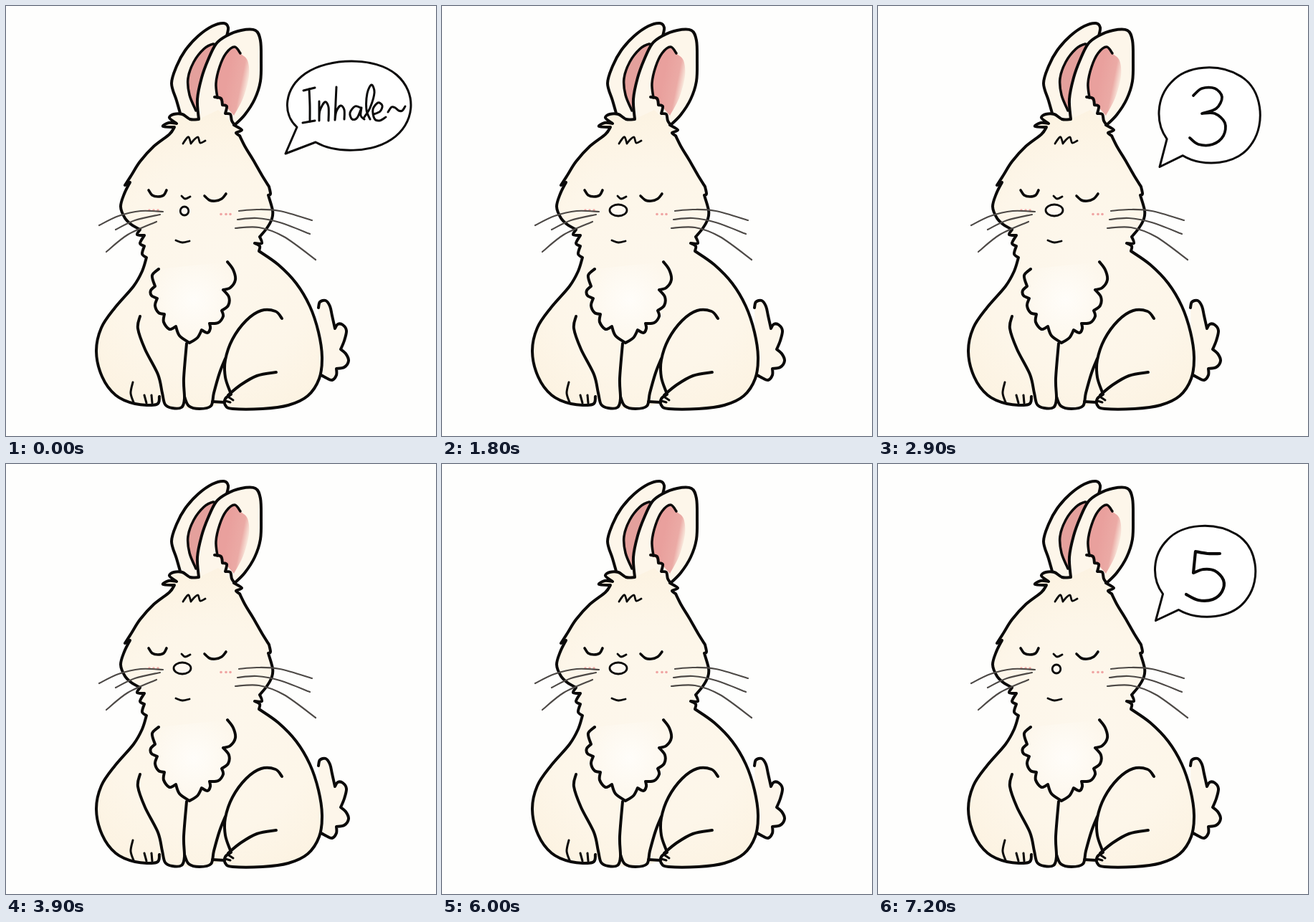
An HTML page for the animation above (8 s loop, 600 by 600 pixels).

```html
<!DOCTYPE html>
<html lang="en">
<head>
<meta charset="utf-8">
<title>Breathing rabbit</title>
<style>
  html, body { margin: 0; width: 100%; height: 100%; overflow: hidden; background: #fefefd; }
  svg { display: block; width: 100%; height: 100%; }
  path, ellipse { fill: none; stroke: #0b0a0a; stroke-width: 4; stroke-linecap: round; stroke-linejoin: round; }
  .bubble { stroke-width: 3; vector-effect: non-scaling-stroke; fill: #fff; }
</style>
</head>
<body>
<svg id="stage" viewBox="0 0 600 600">
  <defs>
    <linearGradient id="innerEar" gradientUnits="userSpaceOnUse" x1="310" y1="95" x2="340" y2="101">
      <stop offset="0" stop-color="#e9a09d"/>
      <stop offset=".65" stop-color="#ebaaa5"/>
      <stop offset="1" stop-color="#fbf2e5"/>
    </linearGradient>
    <radialGradient id="fur" gradientUnits="userSpaceOnUse" cx="290" cy="370" r="240">
      <stop offset="0" stop-color="#fdf7ec"/>
      <stop offset=".6" stop-color="#fdf6e9"/>
      <stop offset="1" stop-color="#fcf2e0"/>
    </radialGradient>
    <radialGradient id="chest" gradientUnits="userSpaceOnUse" cx="262" cy="410" r="62">
      <stop offset="0" stop-color="#fffdf9"/>
      <stop offset="1" stop-color="#fdf7ec"/>
    </radialGradient>
  </defs>
</svg>
<script>
const LOOP = 8000;
const stage = document.getElementById('stage');

function add(tag, attributes, parent = stage) {
  const node = document.createElementNS('http://www.w3.org/2000/svg', tag);
  for (const key in attributes) node.setAttribute(key, attributes[key]);
  return parent.appendChild(node);
}

// Smooth curve through "x,y x,y ..." points; "/" marks a sharp corner.
function curve(text) {
  let d = '', last = null;
  for (const part of text.split('/')) {
    const p = part.trim().split(/\s+/).map(s => s.split(',').map(Number));
    if (last) p.unshift(last);
    else d = 'M' + p[0];
    for (let i = 0; i < p.length - 1; i++) {
      const a = p[i], b = p[i + 1], before = p[i - 1] || a, after = p[i + 2] || b;
      const c1 = a.map((v, k) => v + (b[k] - before[k]) / 6);
      const c2 = b.map((v, k) => v - (after[k] - a[k]) / 6);
      d += `C${c1} ${c2} ${b}`;
    }
    last = p[p.length - 1];
  }
  return d;
}

const fill = (d, color) => add('path', { d, style: `fill:${color};stroke:none` });
const line = (text, width = 4, color = '#0b0a0a', parent = stage) =>
  add('path', { d: curve(text), style: `stroke-width:${width};stroke:${color}` }, parent);

// Tail
const tail = '436,421 438,413 446,411 452,419 455,432 459,450 / 463,444 470,445 475,453 472,467 467,479 / 474,485 478,495 472,504 461,506 / 461,515 455,522 447,519 438,514';
fill(curve(tail), '#fdf6ea');
line(tail);

// Ears
const backEar = '244,153 238,132 231,108 238,84 250,62 268,42 288,28 304,24 310,30 308,42';
const frontEar = '269,158 267,130 273,100 282,75 293,53 307,42 328,34 348,34 355,48 356,75 355,105 347,130 333,152 318,167';
const backInner = '265,146 256,124 254,101 262,78 276,60 289,53 293,56';
const frontInner = '295,128 293,108 298,85 307,66 319,57 327,66';
fill(curve(backEar) + 'L270 158Z', '#fdf6ea');
fill(curve(backInner) + 'L268 150Z', '#e4a09c');
line(backInner, 3.5);
line(backEar);
fill(curve(frontEar) + 'Z', '#fdf6ea');
fill(curve(frontInner + ' 337,76 339,98 331,128 318,153') + 'L306 139Z', 'url(#innerEar)');
line(frontInner, 3.5);
line(frontEar);

// Head and body silhouette
const leftSide = '269,158 257,158 246,151 234,151 228,156 238,164 / 227,163 219,168 235,169 / 228,179 206,196 187,217 175,236 166,250 / 173,246 / 165,262 160,280 166,296 175,305 187,312 / 183,319 193,320 / 187,331 193,335 / 190,346 196,351 / 190,370 178,391 152,421 133,449 126,482 134,517 153,543 180,555 210,556 214,545';
const rightSide = '314,542 306,548 306,557 316,562 358,562 394,557 421,544 437,520 441,490 436,455 424,419 405,387 380,361 353,342 / 354,335 347,331 / 357,331 354,322 / 364,310 371,297 372,285 366,264 / 369,262 367,252 / 357,236 345,215 334,197 326,181 / 321,177 329,173 318,166';
fill(curve(leftSide) + 'L222 558L255 562L285 560L306 553' + curve(rightSide).replace('M', 'L') + 'L296 145Z', 'url(#fur)');
line(leftSide);
line(rightSide);
line('291,127 300,129 302,138 / 308,140 306,150 / 313,151 315,160 319,166');

// Chest fur
const chest = '213,367 204,376 208,391 / 202,397 203,404 211,408 / 208,418 213,428 221,430 / 220,441 228,451 237,447 / 242,460 256,470 / 267,463 273,452 / 281,456 285,450 284,443 / 296,442 303,433 301,425 / 310,418 311,406 303,396 / 313,393 320,382 317,368 309,357';
fill(curve(chest) + 'Z', 'url(#chest)');
line(chest);

// Legs and paws
[
  '187,433 184,450 194,479 212,514 218,540 222,556 232,561 245,560 249,548 248,520 252,471',
  '249,545 255,558 270,562 286,558 290,540 298,512 306,492',
  '385,436 376,426 356,425 335,439 316,465 306,494 306,518 313,539',
  '377,511 350,516 327,529 310,543',
  '288,552 305,553'
].forEach(s => line(s));
['177,525 174,540 178,553', '193,543 196,554', '203,543 204,554', '306,551 313,553', '311,546 317,550']
  .forEach(s => line(s, 3));

// Face
['199,257 204,264 212,266 220,264 224,257', '277,265 284,271 292,272 301,269 307,262']
  .forEach(s => line(s, 3.6));
['245,265 250,269 257,266', '237,327 246,330 256,328', '247,192 251,186 255,183 258,192 / 263,186 268,183 271,191 278,188']
  .forEach(s => line(s, 2.8));
for (const x of [200, 206, 212, 300, 307, 313])
  add('ellipse', { cx: x, cy: x < 250 ? 285 : 290.5, rx: 1.8, ry: 1.8, style: 'fill:#efa5a3;stroke:none' });
[
  '130,306 157,293 188,286 219,287', '153,312 180,299 215,291', '140,343 170,319 210,301',
  '325,286 350,284 382,286 427,299', '323,298 350,296 382,302 424,318', '320,310 353,309 388,322 432,354'
].forEach(s => line(s, 2.2, '#4d4946'));

const nose = add('ellipse', { style: 'fill:#fffaf2;stroke-width:2.8' });

// Speech bubbles
const ROUND = {
  d: 'M398 181C382 160 383 127 404 106C425 83 470 80 500 98C530 116 534 160 516 186C496 217 447 219 420 203L388 218Z',
  box: [387, 86, 527, 218]
};
const WIDE = {
  d: 'M406 169C385 150 388 115 418 94C450 72 515 70 545 96C575 122 570 165 538 186C510 205 460 206 432 190L390 206Z',
  box: [391, 77, 566, 206]
};

function bubble(shape, [left, top, right, bottom], strokes, width, spans) {
  const group = add('g', {});
  const [x0, y0, x1, y1] = shape.box;
  const sx = (right - left) / (x1 - x0), sy = (bottom - top) / (y1 - y0);
  add('path', {
    d: shape.d, class: 'bubble',
    transform: `translate(${left} ${top}) scale(${sx} ${sy}) translate(${-x0} ${-y0})`
  }, group);
  const lettering = add('g', {}, group);
  strokes.forEach(s => line(s, width, '#0b0a0a', lettering));
  return { group, lettering, spans };
}

const hale = [
  '461,113 460,135 459,159 / 461,147 467,139 472,145 472,158',
  '495,142 487,140 480,149 483,158 490,156 496,142 / 495,153 500,158',
  '500,155 508,142 514,121 510,110 504,122 503,145 508,158',
  '513,151 522,147 525,139 519,135 512,144 514,157 521,160 530,155',
  '533,148 538,141 543,142 548,146 553,146 557,140'
];
const moved = (text, dx, dy) =>
  text.replace(/([\d.]+),([\d.]+)/g, (_, x, y) => `${+x + dx},${+y + dy}`);

const bubbles = [
  bubble(WIDE, [391, 77, 566, 206],
    ['415,118 431,114', '423,116 424,139 424,161', '414,163 431,160',
     '437,133 437,160 / 438,146 445,134 450,141 450,160', ...hale], 3, [[0, 700]]),
  bubble(ROUND, [386.5, 86, 527, 218.5],
    ['477,125 460,125 443,122 / 440,152 / 454,147 470,149 482,162 480,178 467,189 447,190 430,182'], 4.2,
    [[900, 1800], [7200, 8000]]),
  bubble(ROUND, [391, 85.5, 533.5, 226.5],
    ['472,198 475,170 481,138 485,110 / 458,127 430,154 / 500,154'], 3.4, [[2000, 2800]]),
  bubble(ROUND, [392, 85.5, 533.5, 224.5],
    ['440,125 452,115 470,115 480,127 472,143 452,150 / 470,150 484,163 482,181 467,193 447,193 435,184'], 3.8,
    [[2900, 3900]]),
  bubble(ROUND, [394.5, 84.5, 540.5, 219.5],
    ['446,127 452,113 467,109 481,118 481,135 468,160 442,188 / 466,185 493,187'], 3.8, [[4000, 4900]]),
  bubble(ROUND, [398.5, 88.5, 543.5, 223.5],
    ['458,128 467,121 475,112 / 474,140 473,165 472,195'], 3.8, [[5100, 6000]]),
  bubble(WIDE, [390.5, 111.5, 558.5, 240.5],
    ['429,150 414,152 / 413,174 413,195 / 431,192', '414,173 427,171', '436,169 443,183 451,194', '451,170 443,183 434,195',
     ...hale.map(s => moved(s, -5, 35))], 3, [[6200, 7000]])
];

function draw(now) {
  const t = now % LOOP;
  const holding = t >= 700 && t < 6200;
  const [cx, cy, rx, ry] = holding ? [246, 285, 12, 8] : [249, 286, 5.8, 6];
  for (const [key, value] of Object.entries({ cx, cy, rx, ry })) nose.setAttribute(key, value);
  for (const { group, spans } of bubbles) {
    const visible = spans.some(([from, to]) => t >= from && t < to);
    group.setAttribute('visibility', visible ? 'visible' : 'hidden');
  }
}

const start = performance.now();
function tick() {
  draw(performance.now() - start);
  requestAnimationFrame(tick);
}
tick();
</script>
</body>
</html>
```
